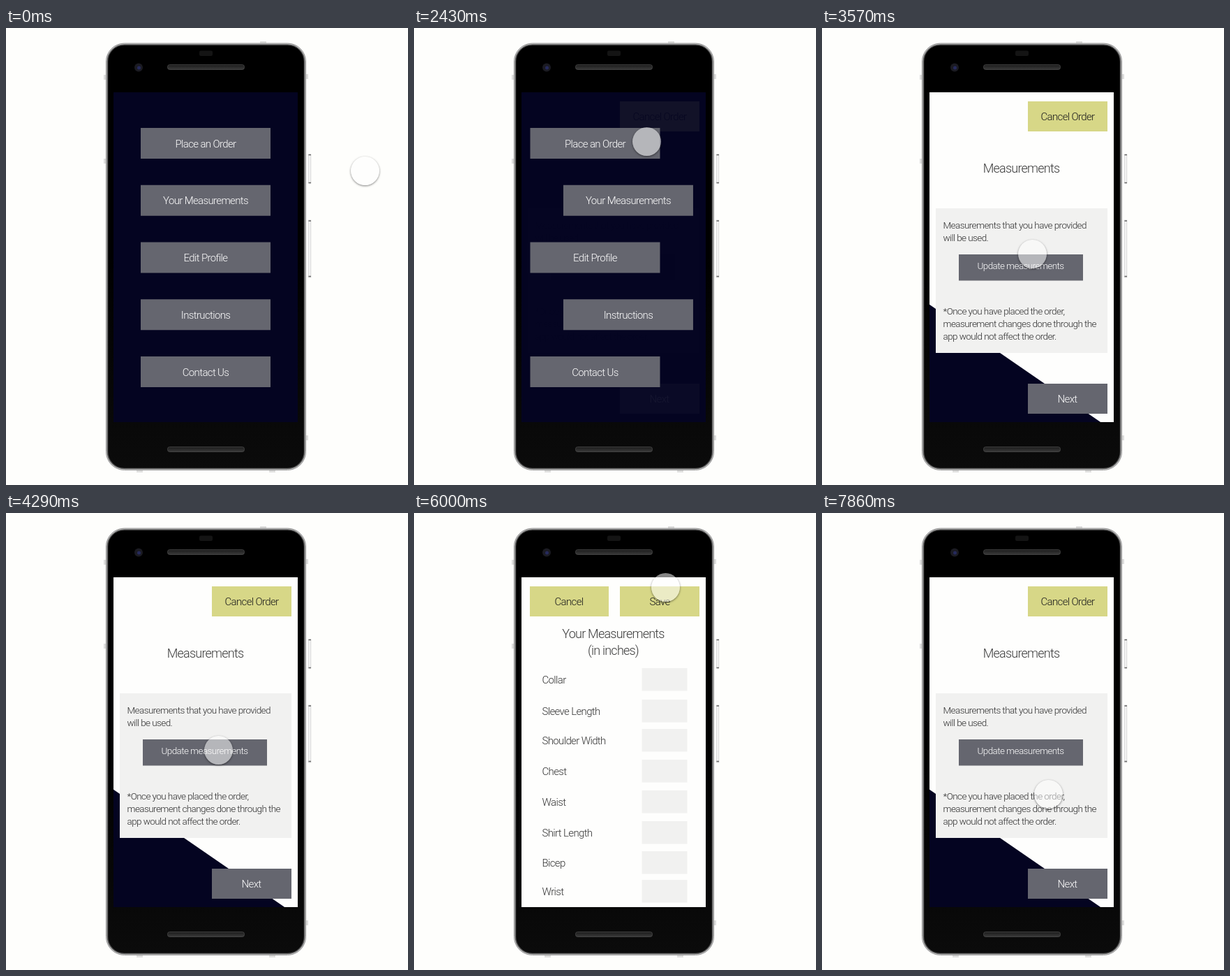
Recreate the animation shown at these times as an HTML page. Size 576 by 654 pixels, loop 8000 ms.

```html
<!DOCTYPE html>
<html lang="en">
<head>
<meta charset="utf-8">
<title>Order app prototype</title>
<style>
  html, body { margin: 0; width: 100%; height: 100%; overflow: hidden; background: #fefefc; }
  #stage { position: relative; width: 576px; height: 654px; overflow: hidden; }
  svg { position: absolute; left: 0; top: 0; display: block; }
  text { font: 300 15px Roboto, "Open Sans", sans-serif; letter-spacing: -.043em; fill: #1c1c1c; }
  .mid { text-anchor: middle; }
  .light { fill: #fff; }
  .title { font-size: 18px; fill: #3a3a3a; }
  .small { font-size: 13.5px; }
  .note { fill: #2c2c2c; }
  .label { fill: #333; }
  .grey { fill: #65666f; }
  .yellow { fill: #d7d787; }
  .field { fill: #f1f1f0; }
  #touch {
    position: absolute; left: -20.5px; top: -20.5px; width: 41px; height: 41px; border-radius: 50%;
    background: rgba(255, 255, 255, .52); box-shadow: 0 1px 3px rgba(0, 0, 0, .5);
  }
</style>
</head>
<body>
<div id="stage">
  <svg width="576" height="654" viewBox="0 0 576 654">
    <defs>
      <clipPath id="screen"><rect x="154" y="92" width="264" height="472"/></clipPath>
      <linearGradient id="body" x1="0" y1="0" x2="0" y2="1">
        <stop offset=".5" stop-color="#000"/>
        <stop offset="1" stop-color="#0b0b0b"/>
      </linearGradient>
      <linearGradient id="slot" x1="0" y1="0" x2="0" y2="1">
        <stop offset="0" stop-color="#1c1c1c"/>
        <stop offset="1" stop-color="#3a3a3a"/>
      </linearGradient>
    </defs>

    <g fill="#dededd">
      <rect x="364" y="19" width="9" height="4"/>
      <rect x="187" y="632" width="9" height="4"/>
      <rect x="377" y="632" width="9" height="4"/>
      <rect x="140" y="67" width="4" height="7"/>
      <rect x="140" y="187" width="4" height="7"/>
      <rect x="429" y="66" width="4" height="7"/>
      <rect x="429" y="583" width="4" height="7"/>
    </g>
    <g fill="#f3f3f2" stroke="#d2d2d2" stroke-width=".8">
      <rect x="433.6" y="181" width="3.2" height="41"/>
      <rect x="433.6" y="275" width="3.2" height="82"/>
    </g>
    <path d="M433.5 181.5h3.5M433.5 221.5h3.5M433.5 276h3.5M433.5 355.5h3.5" stroke="#666" stroke-width="1.4"/>

    <rect x="143.5" y="22" width="286" height="610.5" rx="26" fill="#d4d4d4" stroke="#8c8c8c"/>
    <rect x="145.5" y="24" width="282" height="606.5" rx="24" fill="url(#body)" stroke="#555" stroke-width="1.6"/>
    <g fill="url(#slot)" stroke="#4a4a4a" stroke-width=".8">
      <rect x="231.5" y="52.5" width="110" height="7" rx="3"/>
      <rect x="231.5" y="599.5" width="110" height="7" rx="3"/>
    </g>
    <rect x="277" y="32.5" width="19" height="7.5" rx="2" fill="#141414"/>
    <circle cx="190" cy="56.5" r="6" fill="#1b1b22"/>
    <circle cx="190.5" cy="57" r="2.5" fill="#262a5c"/>

    <g clip-path="url(#screen)">
      <rect x="153" y="92" width="266" height="473" fill="#fefefd"/>
      <path id="navy" d="M153 395L753 807V1400H153Z" fill="#040421"/>
      <g id="order">
        <rect class="field" x="163" y="258" width="246" height="207"/>
        <text class="mid title" x="285.5" y="207">Measurements</text>
        <text class="small note" x="173.5" y="286.5">Measurements that you have provided</text>
        <text class="small note" x="173.5" y="304.5">will be used.</text>
        <rect class="grey" x="196" y="324" width="178" height="37.5"/>
        <text class="mid small light" x="284.5" y="345">Update measurements</text>
        <text class="small note" x="173.5" y="409.5">*Once you have placed the order,</text>
        <text class="small note" x="173.5" y="427.5">measurement changes done through the</text>
        <text class="small note" x="173.5" y="445.5">app would not affect the order.</text>
      </g>
      <g id="actions">
        <rect class="yellow" x="295" y="105" width="114" height="43"/>
        <text class="mid" x="352" y="131.5">Cancel Order</text>
        <rect class="grey" x="295" y="509" width="114" height="43"/>
        <text class="mid light" x="351.5" y="536">Next</text>
      </g>
      <g id="menu"></g>
      <g id="bar">
        <rect class="yellow" x="166" y="105" width="113" height="43"/>
        <text class="mid" x="222" y="131.5">Cancel</text>
        <rect class="yellow" x="295" y="105" width="114" height="43"/>
        <text class="mid" x="352" y="131.5">Save</text>
      </g>
      <g id="heading">
        <text class="mid title" x="285.5" y="179">Your Measurements</text>
        <text class="mid title" x="285.5" y="203">(in inches)</text>
      </g>
      <g id="labels"></g>
      <g id="fields"></g>
    </g>
  </svg>
  <div id="touch"></div>
</div>
<script>
  const LOOP = 8000, FPS = 7, FADE = 180;
  const ui = {};
  for (const el of document.querySelectorAll('[id]')) ui[el.id] = el;

  ui.menu.innerHTML = ['Place an Order', 'Your Measurements', 'Edit Profile', 'Instructions', 'Contact Us']
    .map((name, i) => {
      const y = 143 + i * 81.75;
      return `<g><rect class="grey" x="193" y="${y}" width="186" height="44"/>` +
        `<text class="mid light" x="286" y="${y + 27.5}">${name}</text></g>`;
    }).join('');
  const items = [...ui.menu.children];

  const rows = [['Collar', 222], ['Sleeve Length', 267], ['Shoulder Width', 309], ['Chest', 353],
    ['Waist', 397], ['Shirt Length', 441], ['Bicep', 484], ['Wrist', 525]];
  ui.labels.innerHTML = rows.map(([name, y]) =>
    `<text class="label" x="183.5" y="${y + 22}">${name}</text>`).join('');
  ui.fields.innerHTML = rows.map(([, y]) =>
    `<rect class="field" x="326.5" y="${y}" width="65" height="32.5"/>`).join('');

  // Touch moves: start, end, x, y
  const moves = [
    [430, 1286, 333, 162],
    [2714, 3571, 301, 323],
    [3571, 3857, 304, 339],
    [5286, 6000, 360, 106],
    [6000, 6428, 369, 118],
    [7286, 7857, 324, 402]
  ];

  const ease = k => k < .5 ? 2 * k * k : 1 - 2 * (1 - k) ** 2;
  const span = (t, a, b) => ease(Math.min(1, Math.max(0, (t - a) / (b - a))));
  const shift = (el, x, y) => el.setAttribute('transform', `translate(${x} ${y})`);

  function draw(t) {
    const opened = span(t, 2396, 2396 + FADE);
    const form = span(t, 4400, 4400 + FADE) - span(t, 7077, 7077 + FADE);
    const away = 1 - form;

    items.forEach((el, i) => shift(el, opened * (i % 2 ? 320 : -405), 0));
    shift(ui.navy, 0, -640 * (1 - opened));
    ui.navy.style.opacity = away;
    ui.order.style.opacity = opened ** 2 * away;
    ui.actions.style.opacity = opened * away;
    ui.bar.style.opacity = form;
    shift(ui.labels, -348 * away, 0);
    shift(ui.fields, 148 * away, 0);
    shift(ui.heading, 0, -690 * away);

    let x = 514, y = 204;
    for (const [a, b, tx, ty] of moves) {
      const k = span(t, a, b);
      x += (tx - x) * k;
      y += (ty - y) * k;
    }
    ui.touch.style.transform = `translate(${x}px, ${y}px)`;
  }

  const start = performance.now();
  function tick() {
    const t = (performance.now() - start) % LOOP;
    // The picture is held at seven steps a second
    draw(Math.floor((t + 3) * FPS / 1000) % (LOOP / 1000 * FPS) * 1000 / FPS);
    requestAnimationFrame(tick);
  }
  tick();
</script>
</body>
</html>
```
